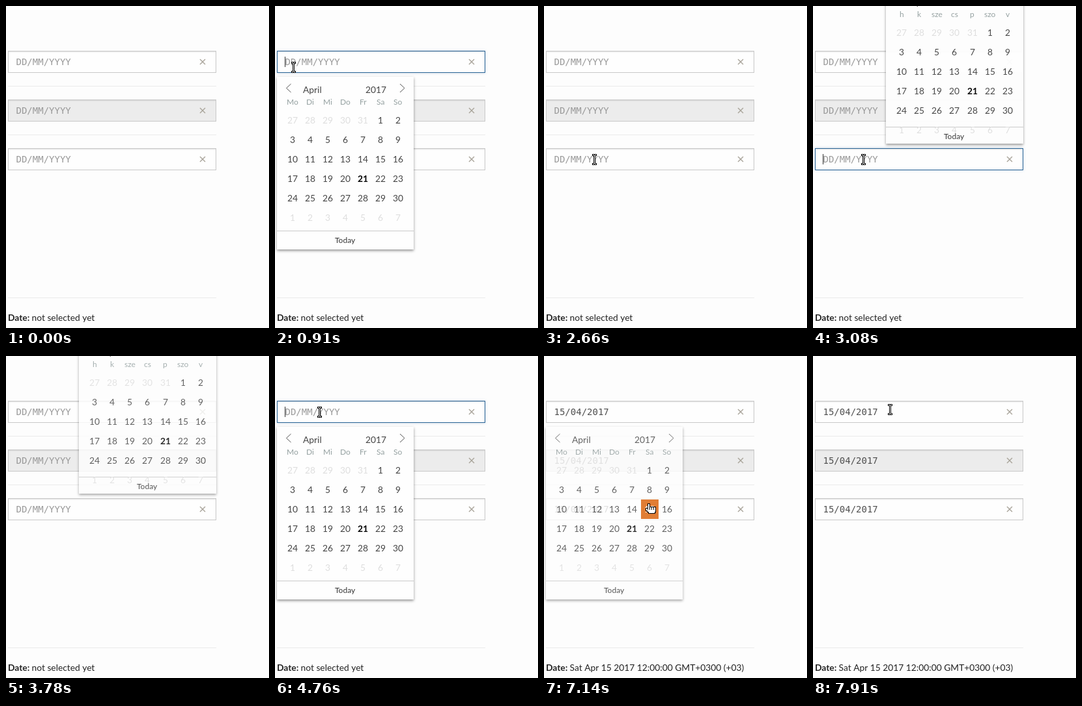
An HTML page with a canvas for the animation above (8000 ms loop, 404 by 496 pixels).

```html
<!DOCTYPE html>
<html lang="en">
<head>
<meta charset="utf-8">
<title>Date picker</title>
<style>
html, body { margin: 0; width: 404px; height: 496px; overflow: hidden; background: #fdfdfd; }
canvas { display: block; }
</style>
</head>
<body>
<canvas id="stage" width="404" height="496"></canvas>
<script>
const LOOP = 8000, TICK = 70;
const PICKED = 6930, COPIED = 7140;
const stage = document.getElementById('stage');
const ctx = stage.getContext('2d');
const layer = document.createElement('canvas');
layer.width = stage.width;
layer.height = stage.height;
const pop = layer.getContext('2d');

const SANS = '13.8px Lato, sans-serif', SMALL = '12px Lato, sans-serif';
const MONO = '14px "DejaVu Sans Mono", monospace';
const fieldTop = i => 69 + 75 * i;

const german = {
  x: 3, w: 210, top: 109, height: 266, footer: 29,
  month: 'April', days: 'Mo Di Mi Do Fr Sa So'.split(' ')
};
const hungarian = {
  x: 112, w: 211, top: -26, height: 238, footer: 26,
  month: 'április', days: 'h k sze cs p szo v'.split(' ')
};

const sessions = [
  { field: 0, cal: german, focus: 560, blur: 1790 },
  { field: 2, cal: hungarian, focus: 2765, blur: 3570 },
  { field: 0, cal: german, focus: 4410, blur: PICKED }
];

const clamp = v => Math.max(0, Math.min(1, v));
const ramp = (t, start, length) => length ? clamp((t - start) / length) : +(t >= start);
const smooth = v => v * v * (3 - 2 * v);

// April 2017 starts on a Saturday, so its first row holds five days of March
function cellOf(cal, day) {
  const n = day + 4;
  return {
    x: cal.x + cal.w / 2 + (n % 7 - 3) * cal.w * 9 / 70,
    y: cal.top + 67 + Math.floor(n / 7) * 30
  };
}

const point = (x, y) => ({ x, y });
const offLeft = y => point(-20, y);
const glides = [
  { at: 420, length: 140, to: point(28, 94) },
  { at: 1050, length: 210, to: offLeft(112) },
  { at: 2200, length: 0, to: offLeft(190) },
  { at: 2200, length: 460, to: point(77, 236) },
  { at: 3500, length: 140, to: offLeft(225) },
  { at: 4060, length: 0, to: offLeft(100) },
  { at: 4060, length: 210, to: point(68, 86) },
  { at: 5530, length: 70, to: cellOf(german, 4) },
  { at: 5600, length: 140, to: point(219, 307) },
  { at: 5810, length: 210, to: cellOf(german, 13) },
  { at: 6160, length: 350, to: cellOf(german, 15) },
  { at: 7420, length: 490, to: point(118, 82) }
];

function pointerAt(t) {
  let { x, y } = offLeft(112);
  for (const { at, length, to } of glides) {
    const p = ramp(t, at, length);
    x += (to.x - x) * p;
    y += (to.y - y) * p;
  }
  return point(Math.round(x), Math.round(y));
}

function text(c, str, x, y, font, color) {
  c.font = font;
  c.fillStyle = color;
  c.fillText(str, x, y);
}

function centered(c, str, x, y, font, color) {
  c.font = font;
  text(c, str, Math.round(x - c.measureText(str).width / 2), y, font, color);
}

function rect(c, x, y, w, h, color) {
  c.fillStyle = color;
  c.fillRect(x, y, w, h);
}

function frame(x, y, w, h, color) {
  ctx.lineWidth = 1;
  ctx.strokeStyle = color;
  ctx.strokeRect(x + 0.5, y + 0.5, w - 1, h - 1);
}

function line(c, x1, y1, x2, y2, color, width = 1) {
  c.beginPath();
  c.moveTo(x1, y1);
  c.lineTo(x2, y2);
  c.strokeStyle = color;
  c.lineWidth = width;
  c.stroke();
}

function drawField(i, t) {
  const y = fieldTop(i), disabled = i === 1;
  const session = sessions.find(s => s.field === i && t > s.focus && t < s.blur + 70);
  const glow = session ? ramp(t, session.focus, 140) * (1 - ramp(t, session.blur - 70, 140)) : 0;
  const filled = t >= (i === 0 ? PICKED : COPIED);

  ctx.save();
  ctx.shadowColor = `rgba(60,110,160,${0.3 * glow})`;
  ctx.shadowBlur = 4;
  rect(ctx, 3, y, 320, 34, disabled ? '#ececec' : '#fefefe');
  ctx.restore();
  rect(ctx, 4, y + 1, 318, 1, 'rgba(0,0,0,.09)');
  rect(ctx, 4, y + 2, 318, 1, 'rgba(0,0,0,.03)');
  frame(3, y, 320, 34, '#c8c8c8');
  frame(3, y, 320, 34, `rgba(42,100,150,${glow})`);

  text(ctx, filled ? '15/04/2017' : 'DD/MM/YYYY', 15.5, y + 22, MONO, filled ? '#505050' : '#999');
  if (session && t < session.blur) rect(ctx, 15, y + 9, 1, 16, '#333');
  for (const side of [-4, 4]) line(ctx, 302 - side, y + 13, 302 + side, y + 21, '#aaa59b', 1.5);
}

function drawCalendar(cal, pointer) {
  const { x, w, top, height } = cal;
  const footer = top + height - cal.footer, mid = top + 17.5;
  pop.clearRect(0, 0, layer.width, layer.height);
  pop.save();
  pop.shadowColor = 'rgba(0,0,0,.42)';
  pop.shadowBlur = 4;
  pop.shadowOffsetY = 1.5;
  rect(pop, x, top, w, height, '#fefefe');
  pop.restore();

  for (const dy of [-6.5, 6.5]) {
    line(pop, x + 14.5, mid, x + 21.5, mid + dy, '#555');
    line(pop, x + 196, mid, x + 189, mid + dy, '#555');
  }
  text(pop, cal.month, x + 40, top + 25, SANS, '#444');
  text(pop, '2017', x + 136, top + 25, SANS, '#444');
  cal.days.forEach((name, i) =>
    centered(pop, name, cellOf(cal, i - 4).x, top + 43, SMALL, '#94a0a0'));
  rect(pop, x, footer, w, 1, '#c9c9c9');
  centered(pop, 'Today', x + w / 2 - 0.5, footer + 19, SMALL, '#333');

  for (let day = -4; day < 38; day++) {
    const cell = cellOf(cal, day);
    const outside = day < 1 || day > 30;
    const hover = !outside && Math.abs(pointer.x - cell.x) < 13.5 && Math.abs(pointer.y - cell.y) < 15;
    if (hover) rect(pop, Math.round(cell.x - 13.5), cell.y - 15, 27, 30, '#db630c');
    const label = day < 1 ? day + 31 : day > 30 ? day - 30 : day;
    const color = hover ? '#fff' : outside ? '#dedede' : day === 21 ? '#000' : '#444';
    centered(pop, label, cell.x, cell.y + 5, (day === 21 ? 'bold ' : '') + SANS, color);
  }
}

// Draws all parts grown by a pixel in black, then again in white
function outlined(x, y, addParts) {
  for (const [color, grow] of [['#000', 1], ['#fff', 0]]) {
    addParts((px, py, w, h) =>
      rect(ctx, x + px - grow, y + py - grow, w + 2 * grow, h + 2 * grow, color));
  }
}

function drawIBeam(x, y) {
  outlined(x, y, part => {
    part(0, -6, 1, 13);
    for (const end of [-7, 7]) {
      part(-2, end, 2, 1);
      part(1, end, 2, 1);
    }
  });
}

function drawHand(x, y) {
  outlined(x + 1, y - 1, part => {
    part(-3, -7, 2, 9);
    for (let finger = 0; finger < 3; finger++) part(3 * finger, -2, 2, 5);
    part(-6, 0, 2, 3);
    part(-4, 2, 12, 3);
    part(-2, 5, 9, 2);
  });
}

function drawArrow(x, y) {
  ctx.save();
  ctx.translate(x, y);
  const outline = new Path2D('M0 0V16L4 12.5 6.5 18 9 17 6.5 11.5H11.5Z');
  ctx.fillStyle = '#fff';
  ctx.fill(outline);
  ctx.strokeStyle = '#000';
  ctx.lineWidth = 1;
  ctx.stroke(outline);
  ctx.restore();
}

const inside = (p, x, y, w, h) => p.x >= x && p.x < x + w && p.y >= y && p.y < y + h;

function drawPointer(pointer, overCalendar) {
  const overField = [0, 1, 2].some(i => inside(pointer, 3, fieldTop(i), 320, 34));
  const draw = overCalendar ? drawHand : overField ? drawIBeam : drawArrow;
  draw(pointer.x, pointer.y);
}

function render(t) {
  const pointer = pointerAt(t);
  let overCalendar = false;
  rect(ctx, 0, 0, stage.width, stage.height, '#fdfdfd');
  for (const y of [123, 198, 449]) rect(ctx, 3, y, 320, 1, '#ebebeb');
  for (let i = 0; i < 3; i++) drawField(i, t);

  const date = t >= COPIED ? 'Sat Apr 15 2017 12:00:00 GMT+0300 (+03)' : 'not selected yet';
  text(ctx, 'Date:', 3, 485, 'bold ' + SANS, '#222');
  text(ctx, date, 39.5, 485, SANS, '#222');

  for (const { cal, focus, blur } of sessions) {
    const alpha = smooth(ramp(t, focus, 350)) * (1 - smooth(ramp(t, blur + 140, 270)));
    if (!alpha) continue;
    drawCalendar(cal, pointer);
    ctx.globalAlpha = alpha;
    ctx.drawImage(layer, 0, 0);
    ctx.globalAlpha = 1;
    overCalendar = inside(pointer, cal.x, cal.top, cal.w, cal.height);
  }
  drawPointer(pointer, overCalendar);
}

function loop() {
  const t = performance.now() % LOOP;
  render(Math.floor(t / TICK) * TICK);
  requestAnimationFrame(loop);
}
loop();
</script>
</body>
</html>
```
